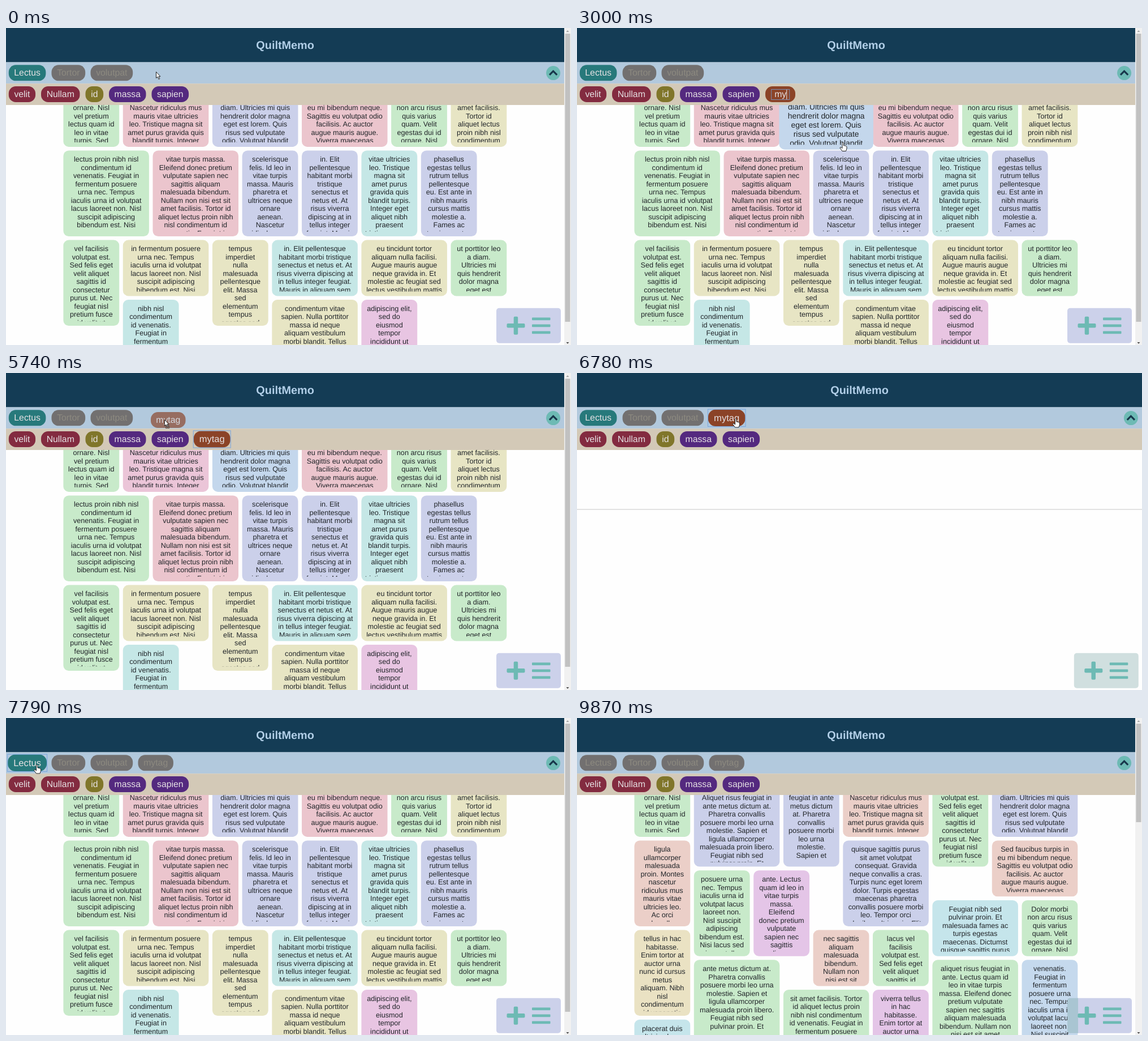
Write an HTML page that moves like this. It is 999 by 560 pixels and loops after 9970 ms.

```html
<!DOCTYPE html>
<html lang="en">
<head>
<meta charset="utf-8">
<title>Note board</title>
<style>
  html, body { margin: 0; width: 100%; height: 100%; overflow: hidden; background: #fefefe; }
  svg { display: block; font-family: "Liberation Sans", Arial, sans-serif; }
  text { text-anchor: middle; text-rendering: geometricPrecision; }
</style>
</head>
<body>
<svg id="stage" width="999" height="560" viewBox="0 0 999 560"></svg>
<script>
const LOOP = 9970;
const UNIT = 52.7, GAP = 6.6, PAD = 7.9, LINE = 14.5;
const ORIGIN = { x: 101.4, y: 111.1 };
const BROWN = '#8b4327', GREY = '#727070', TEAL = '#6dbab4';
const PALETTE = {
  green: '#c8eaca', pink: '#ebc5cd', lav: '#cbd0ea', yellow: '#e7e5c4', cyan: '#c5e7e6',
  orchid: '#e8c5e2', salmon: '#ebcfc8', lilac: '#e4c5e7', sand: '#eae2c3', sky: '#c5e5eb'
};

const stage = document.getElementById('stage');

function add(parent, name, attrs = {}, content) {
  const node = document.createElementNS('http://www.w3.org/2000/svg', name);
  set(node, attrs);
  if (content !== undefined) node.textContent = content;
  parent.appendChild(node);
  return node;
}
function set(node, attrs) {
  for (const key in attrs) node.setAttribute(key, attrs[key]);
}
const show = (node, visible) => set(node, { display: visible ? 'inline' : 'none' });
const box = (parent, x, y, width, height, fill, rx = 0) =>
  add(parent, 'rect', { x, y, width, height, fill, rx });
const scaleAbout = (x, y, s) => `translate(${x} ${y}) scale(${s}) translate(${-x} ${-y})`;

// Each card: "column row width height colour", then its lines split by "|".
const filteredCards = [
  ['0 0 2 2 green', '|ornare. Nisl|vel pretium|lectus quam id|leo in vitae|turpis. Sed'],
  ['2 0 3 2 pink', '|Nascetur ridiculus mus|mauris vitae ultricies|leo. Tristique magna sit|amet purus gravida quis|blandit turpis. Integer'],
  ['8 0 3 2 pink', '|eu mi bibendum neque.|Sagittis eu volutpat odio|facilisis. Ac auctor|augue mauris augue.|Viverra maecenas'],
  ['11 0 2 2 green', '|non arcu risus|quis varius|quam. Velit|egestas dui id|ornare. Nisl'],
  ['13 0 2 2 yellow', '|amet facilisis.|Tortor id|aliquet lectus|proin nibh nisl|condimentum'],
  ['0 2 3 3 green', 'lectus proin nibh nisl|condimentum id|venenatis. Feugiat in|fermentum posuere|urna nec. Tempus|iaculis urna id volutpat|lacus laoreet non. Nisl|suscipit adipiscing|bibendum est. Nisi'],
  ['3 2 3 3 pink', 'vitae turpis massa.|Eleifend donec pretium|vulputate sapien nec|sagittis aliquam|malesuada bibendum.|Nullam non nisi est sit|amet facilisis. Tortor id|aliquet lectus proin nibh|nisl condimentum id|venenatis. Feugiat in'],
  ['6 2 2 3 lav', 'scelerisque|felis. Id leo in|vitae turpis|massa. Mauris|pharetra et|ultrices neque|ornare|aenean.|Nascetur|ridiculus mus'],
  ['8 2 2 3 lav', 'in. Elit|pellentesque|habitant morbi|tristique|senectus et|netus et. At|risus viverra|dipiscing at in|tellus integer|feugiat. Mauris'],
  ['10 2 2 3 cyan', 'vitae ultricies|leo. Tristique|magna sit|amet purus|gravida quis|blandit turpis.|Integer eget|aliquet nibh|praesent|tristique magna'],
  ['12 2 2 3 lav', 'phasellus|egestas tellus|rutrum tellus|pellentesque|eu. Est ante in|nibh mauris|cursus mattis|molestie a.|Fames ac|turpis egestas'],
  ['0 5 2 3 green', 'vel facilisis|volutpat est.|Sed felis eget|velit aliquet|sagittis id|consectetur|purus ut. Nec|feugiat nisl|pretium fusce|id velit ut'],
  ['2 5 3 2 yellow', 'in fermentum posuere|urna nec. Tempus|iaculis urna id volutpat|lacus laoreet non. Nisl|suscipit adipiscing|bibendum est. Nisi'],
  ['5 5 2 3 yellow', 'tempus|imperdiet|nulla|malesuada|pellentesque|elit. Massa|sed|elementum|tempus|egestas sed'],
  ['7 5 3 2 cyan', 'in. Elit pellentesque|habitant morbi tristique|senectus et netus et. At|risus viverra dipiscing at|in tellus integer feugiat.|Mauris in aliquam sem'],
  ['10 5 3 2 yellow', 'eu tincidunt tortor|aliquam nulla facilisi.|Augue mauris augue|neque gravida in. Et|molestie ac feugiat sed|lectus vestibulum mattis'],
  ['13 5 2 2 green', 'ut porttitor leo|a diam.|Ultricies mi|quis hendrerit|dolor magna|eget est'],
  ['2 7 2 3 cyan', 'nibh nisl|condimentum|id venenatis.|Feugiat in|fermentum'],
  ['7 7 3 3 yellow', 'condimentum vitae|sapien. Nulla porttitor|massa id neque|aliquam vestibulum|morbi blandit. Tellus'],
  ['10 7 2 3 orchid', 'adipiscing elit,|sed do|eiusmod|tempor|incididunt ut'],
  ['5 0 3 2 lav', '|diam. Ultricies mi quis|hendrerit dolor magna|eget est lorem. Quis|risus sed vulputate|odio. Volutpat blandit']
];
const allCards = [
  filteredCards[0],
  ['2 0 3 3 lav', '|Aliquet risus feugiat in|ante metus dictum at.|Pharetra convallis|posuere morbi leo urna|molestie. Sapien et|ligula ullamcorper|malesuada proin libero.|Feugiat nibh sed|pulvinar proin. Et'],
  ['5 0 2 3 lav', '|feugiat in ante|metus dictum|at. Pharetra|convallis|posuere morbi|leo urna|molestie.|Sapien et'],
  ['7 0 3 2 salmon', filteredCards[1][1]],
  ['10 0 2 3 green', '|volutpat est.|Sed felis eget|velit aliquet|sagittis id|consectetur|purus ut. Nec|feugiat nisl|pretium fusce|id velit ut'],
  ['12 0 3 2 lav', filteredCards[20][1]],
  ['0 2 2 3 salmon', 'ligula|ullamcorper|malesuada|proin. Montes|nascetur|ridiculus mus|mauris vitae|ultricies leo.|Ac orci|phasellus'],
  ['7 2 3 3 lav', 'quisque sagittis purus|sit amet volutpat|consequat. Gravida|neque convallis a cras.|Turpis nunc eget lorem|dolor. Turpis egestas|maecenas pharetra|convallis posuere morbi|leo. Tempor orci|dapibus ultrices in. Elit'],
  ['12 2 3 2 salmon', 'Sed faucibus turpis in|eu mi bibendum neque.|Sagittis eu volutpat odio|facilisis. Ac auctor|augue mauris augue.|Viverra maecenas'],
  ['2 3 2 3 green', 'posuere urna|nec. Tempus|iaculis urna id|volutpat lacus|laoreet non.|Nisl suscipit|adipiscing|bibendum est.|Nisi lacus sed|viverra tellus'],
  ['4 3 2 3 lilac', 'ante. Lectus|quam id leo in|vitae turpis|massa.|Eleifend|donec pretium|vulputate|sapien nec|sagittis|aliquam'],
  ['10 4 3 2 sky', 'Feugiat nibh sed|pulvinar proin. Et|malesuada fames ac|turpis egestas|maecenas. Dictumst|quisque sagittis purus'],
  ['13 4 2 2 green', 'Dolor morbi|non arcu risus|quis varius|quam. Velit|egestas dui id|ornare. Nisl'],
  ['0 5 2 3 sand', 'tellus in hac|habitasse.|Enim tortor at|auctor urna|nunc id cursus|metus|aliquam. Nibh|nisl|condimentum|id venenatis'],
  ['6 5 2 2 salmon', 'nec sagittis|aliquam|malesuada|bibendum.|Nullam non|nisi est sit'],
  ['8 5 2 2 green', 'lacus vel|facilisis|volutpat est.|Sed felis eget|velit aliquet|sagittis id'],
  ['2 6 3 3 green', 'ante metus dictum at.|Pharetra convallis|posuere morbi leo urna|molestie. Sapien et|ligula ullamcorper|malesuada proin libero.|Feugiat nibh sed|pulvinar proin. Et'],
  ['10 6 3 3 green', 'aliquet risus feugiat in|ante. Lectus quam id|leo in vitae turpis|massa. Eleifend donec|pretium vulputate|sapien nec sagittis|aliquam malesuada|bibendum. Nullam non|nisi est sit amet'],
  ['5 7 3 3 green', 'sit amet facilisis. Tortor|id aliquet lectus proin|nibh nisl condimentum|id venenatis. Feugiat in|fermentum posuere'],
  ['8 7 2 3 lilac', 'viverra tellus|in hac|habitasse.|Enim tortor at|auctor urna'],
  ['0 8 2 3 sky', 'placerat duis|ultricies lacus'],
  ['13 6 2 3 lav', 'venenatis.|Feugiat in|fermentum|posuere urna|nec. Tempus|iaculis urna id|volutpat lacus|laoreet non.|Nisl suscipit']
];

function makeCard(parent, [spec, lines]) {
  const [col, row, w, h, colour] = spec.split(' ');
  const x = ORIGIN.x + col * UNIT, y = ORIGIN.y + row * UNIT;
  const width = w * UNIT - GAP, height = h * UNIT - GAP;
  const group = add(parent, 'g');
  const rect = box(group, x, y, width, height, PALETTE[colour], 9.5);
  const clip = add(group, 'svg', { x, y, width, height: height - PAD, overflow: 'hidden', 'font-size': 12.64, fill: '#212529' });
  lines.split('|').forEach((line, i) =>
    add(clip, 'text', { x: width / 2, y: 19.9 + i * LINE }, line));
  return {
    scale: s => set(group, { transform: scaleAbout(x + width / 2, y + height / 2, s) }),
    paint: fill => set(rect, { fill })
  };
}

function makeTag(parent, label, x, width, y, colour) {
  const group = add(parent, 'g');
  const body = add(group, 'g');
  const rect = box(body, x, y, width, 28, colour, 12.5);
  const text = add(body, 'text', { x: x + width / 2, y: y + 19, 'font-size': 15.8, fill: '#e6e2e4' }, label);
  const ring = add(body, 'rect', { x: x - .5, y: y - .5, width: width + 1, height: 29, fill: 'none', stroke: '#79a7df' });
  show(ring, false);
  return {
    group, rect, text,
    update({ visible = true, active = true, scale = 1, focus = false }) {
      show(group, visible);
      set(rect, { fill: active ? colour : GREY });
      set(text, { fill: active ? '#e6e2e4' : '#8d8a80' });
      set(body, { transform: scaleAbout(x + width / 2, y + 14, scale) });
      show(ring, focus);
    }
  };
}

// Cards
const filtered = add(stage, 'g'), everything = add(stage, 'g');
const filteredNodes = filteredCards.map(card => makeCard(filtered, card));
const allNodes = allCards.map(card => makeCard(everything, card));
const hoverCard = filteredNodes[20], pinkCard = filteredNodes[1], lastCard = allNodes[21];
const rule = box(stage, 0, 240.5, 999, 1, '#c8c8c8');

// Bars
box(stage, 0, 0, 999, 60.5, '#143c55');
box(stage, 0, 60.5, 999, 37.7, '#b2c9dd');
box(stage, 0, 98.2, 999, 37.8, '#d3c9b7');
const title = add(stage, 'text', { x: 493.6, y: 36.5, 'font-size': 19.85, 'font-weight': 700, fill: '#b2cfe8' }, 'QuiltMemo');

// Controls on the right edge
const controls = add(stage, 'g');
add(controls, 'circle', { cx: 967.6, cy: 79.6, r: 12.5, fill: TEAL });
add(controls, 'path', { d: 'M961 82.8l6.6-6.6 6.6 6.6', fill: 'none', stroke: '#17364a', 'stroke-width': 3.2 });
const panel = box(controls, 867, 494.7, 114, 62, '#ccd1ea', 5);
const overlap = add(controls, 'path', { d: 'M886 494.7H872q-5 0-5 5V551.700q0 5 5 5H886z', fill: '#a9c5d2' });
box(controls, 885.5, 522, 32, 7.500, TEAL, 2);
box(controls, 897.7, 509.700, 7.500, 32, TEAL, 2);
for (let i = 0; i < 3; i++) box(controls, 930, 511.500 + i * 12, 32.500, 4.800, TEAL, 1);

// Scrollbar
const scrollbar = add(stage, 'g');
box(scrollbar, 987, 0, 12, 560, '#f1f1f1');
const thumb = box(scrollbar, 988.5, 10, 9, 509, '#c1c1c1');
add(scrollbar, 'path', { d: 'M990.500 7l2.500-3 2.500 3z', fill: '#a3a3a3' });
add(scrollbar, 'path', { d: 'M990.500 555l2.500 3 2.500-3z', fill: '#505050' });

// Tags
const TOP = 65.3, LOW = 103;
const lectus = makeTag(stage, 'Lectus', 4.8, 65.6, TOP, '#27797b');
makeTag(stage, 'Tortor', 80.5, 59.700, TOP, GREY).update({ active: false });
makeTag(stage, 'volutpat', 149.5, 74.700, TOP, GREY).update({ active: false });
const topTag = makeTag(stage, 'mytag', 233.5, 62.4, TOP, BROWN);
makeTag(stage, 'velit', 4.8, 47.3, LOW, '#832b40');
makeTag(stage, 'Nullam', 62, 68.5, LOW, '#832b40');
makeTag(stage, 'id', 140.5, 31.7, LOW, '#80762a');
makeTag(stage, 'massa', 182, 65.5, LOW, '#54297f');
makeTag(stage, 'sapien', 257.5, 65.6, LOW, '#54297f');
const lowTag = makeTag(stage, 'mytag', 333, 62.4, LOW, BROWN);

// Tag being typed
const editor = add(stage, 'g');
const editorPill = box(editor, 333, LOW, 53, 28, BROWN, 12.5);
const field = add(editor, 'rect', { y: 108.5, height: 18, fill: 'none', stroke: '#7b8fb5' });
const typed = add(editor, 'text', { y: 122, 'font-size': 15.8, fill: '#e6e2e4' });
const caret = box(editor, 0, 109, 1, 17, '#eee');

// Dragged copy, drawn relative to the pointer
const ghost = add(stage, 'g', { opacity: .68 });
makeTag(ghost, 'mytag', -24, 61.5, -13, BROWN);

// Pointers
const ink = { fill: '#fff', stroke: '#222', 'stroke-width': 1, 'stroke-linejoin': 'round' };
const pointers = { arrow: add(stage, 'g'), hand: add(stage, 'g'), drag: add(stage, 'g') };
const arrowPath = 'M.5.5V11.500L3 9.200 5 13.500 6.800 12.700 4.900 8.700H8z';
add(pointers.arrow, 'path', { d: arrowPath, ...ink });
add(pointers.drag, 'path', { d: arrowPath, ...ink });
add(pointers.drag, 'rect', { x: 2.5, y: 11.5, width: 6, height: 4, fill: 'none', stroke: '#555' });
add(pointers.hand, 'path', {
  d: 'M0 1.200Q1.200-.5 2.400 1.200V6L6.500 6.800 8 8V11.500L6.500 16H0L-4 10.500Q-4 8.500-2 9.200L0 11z', ...ink
});

// Moves: first step, last step, step count, destination, pointer kind
const moves = [
  [250, 490, 3, 357, 126, 'arrow'],
  [630, 760, 2, 362, 118, 'arrow'],
  [900, 1150, 3, 402, 142, 'arrow'],
  [1290, 1650, 4, 468, 200, 'hand'],
  [1800, 1920, 2, 469, 201.5, 'hand'],
  [4700, 4820, 2, 414, 160, 'hand'],
  [4970, 5210, 3, 357, 117, 'hand'],
  [5350, 5350, 1, 383, 97, 'drag'],
  [5500, 5740, 3, 280, 82, 'drag'],
  [5870, 5870, 1, 280, 82, 'arrow'],
  [6410, 6410, 1, 279.5, 80, 'hand'],
  [7160, 7790, 6, 53.5, 82, 'hand'],
  [8730, 9090, 4, 784, 402, 'arrow'],
  [9230, 9230, 1, 845, 500, 'hand'],
  [9350, 9350, 1, -60, -60, 'arrow']
];

function pointerAt(t) {
  let x = 265, y = 77, kind = 'arrow';
  for (const [start, end, steps, toX, toY, nextKind] of moves) {
    if (t < start) break;
    const gap = (end - start) / Math.max(1, steps - 1) || 1;
    const part = Math.min(steps, Math.floor((t - start) / gap + .03) + 1) / steps;
    x += (toX - x) * part;
    y += (toY - y) * part;
    kind = nextKind;
  }
  return { x, y, kind };
}

const within = (t, from, to) => t >= from && t < to;
// Value of the latest [time, value] pair that has been reached.
const stepped = (t, first, ...pairs) => pairs.reduce((value, [at, next]) => t >= at ? next : value, first);

function drawEditor(t) {
  show(editor, within(t, 1290, 3920));
  const word = stepped(t, '', [2600, 'm'], [3000, 'my'], [3120, 'myt'], [3240, 'myta'], [3510, 'mytag']);
  typed.textContent = word;
  const width = stepped(t, 0, [2600, 13.2], [3000, 21.1], [3120, 25.5], [3240, 34.2], [3510, 43]);
  const center = stepped(t, 359.7, [3240, 361], [3510, 364.2]);
  const outline = Math.max(32, width);
  set(typed, { x: center });
  set(field, { x: center - outline / 2, width: outline });
  set(editorPill, { width: t < 3510 ? 53 : 62.4 });
  set(caret, { x: center + width / 2 });
  show(caret, !within(t, 1920, 2450));
}

function draw(t) {
  const empty = within(t, 5870, 6920);
  const full = t >= 7930;
  show(filtered, !empty && !full);
  show(everything, full);
  show(rule, empty);
  show(scrollbar, !empty);
  set(thumb, { height: full ? 174 : 509 });
  set(title, { x: empty ? 499.5 : 493.6 });
  set(controls, { transform: `translate(${empty ? 11.8 : 0} 0)` });
  set(panel, { fill: empty ? '#d0dfdf' : '#ccd1ea' });
  show(overlap, full);

  hoverCard.scale(stepped(t, 1, [1410, 1.03], [1530, 1.08], [1650, 1.1], [4970, 1.06], [5090, 1]));
  hoverCard.paint(within(t, 1530, 6000) ? '#c4d7ec' : PALETTE.lav);
  pinkCard.paint(within(t, 5620, 6000) ? '#ebc5d8' : PALETTE.pink);
  lastCard.scale(within(t, 9230, 9350) ? 1.04 : 1);
  lastCard.paint(t >= 9230 ? '#c5d9ed' : PALETTE.lav);

  drawEditor(t);
  lowTag.update({ visible: within(t, 3920, 5870), scale: t >= 5090 ? 1.04 : 1, focus: t >= 5090 });
  topTag.update({
    visible: t >= 5870, active: t < 6920,
    scale: within(t, 6410, 7290) ? 1.05 : 1, focus: within(t, 6660, 7790)
  });
  lectus.update({
    active: t < 8050,
    scale: within(t, 7660, 8850) ? 1.05 : 1, focus: within(t, 7790, 9870)
  });

  const { x, y, kind } = pointerAt(t);
  for (const name in pointers) {
    show(pointers[name], name === kind);
    set(pointers[name], { transform: `translate(${x} ${y})` });
  }
  show(ghost, kind === 'drag');
  set(ghost, { transform: `translate(${x} ${y})` });
}

const began = performance.now();
function tick() {
  draw((performance.now() - began) % LOOP);
  requestAnimationFrame(tick);
}
tick();
</script>
</body>
</html>
```
